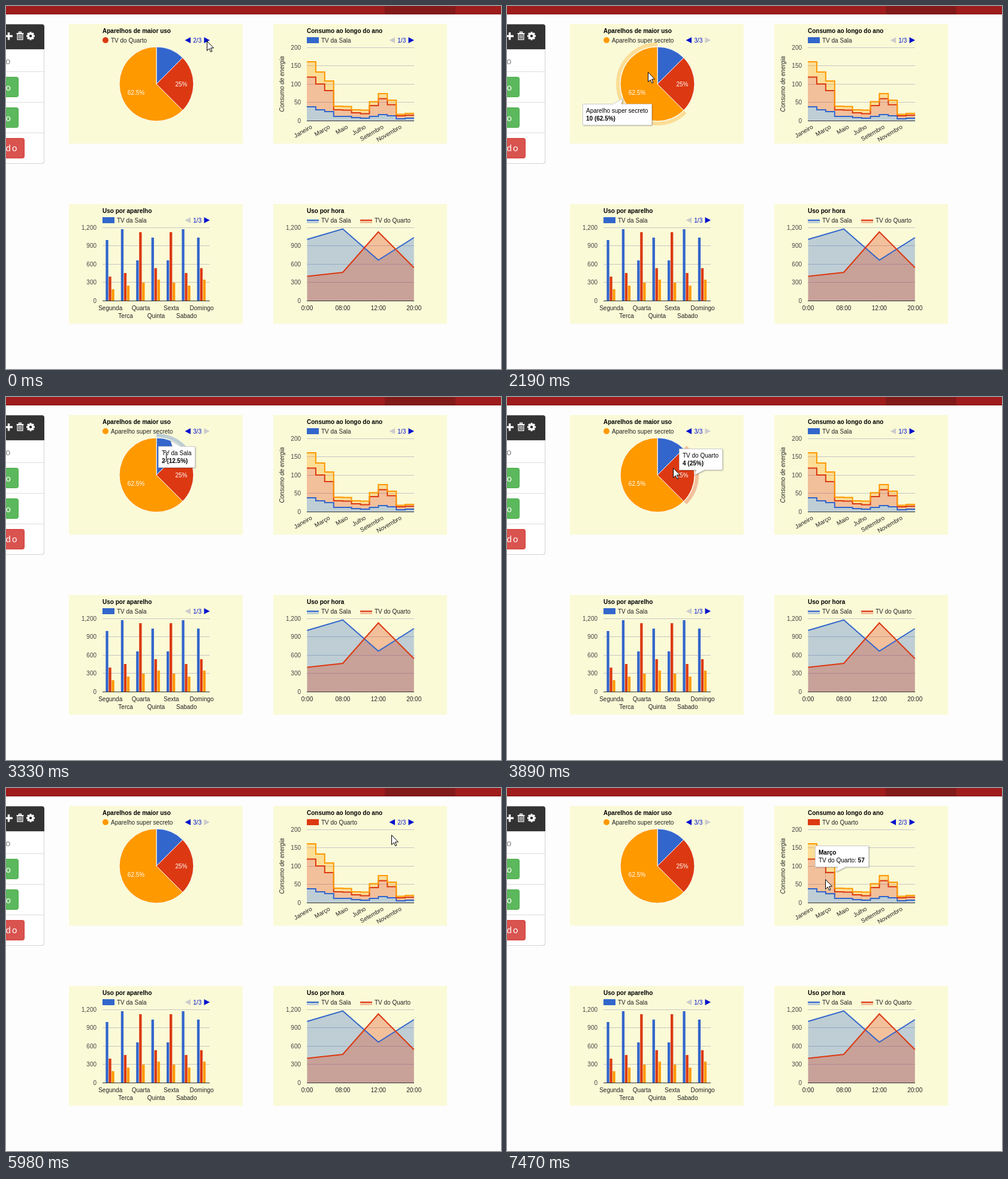
Recreate the animation shown at these times as an HTML page with a canvas. Size 826 by 605 pixels, loop 8 s.

```html
<!DOCTYPE html>
<html lang="pt">
<head>
<meta charset="utf-8">
<title>Painel de consumo</title>
<style>
html, body { margin: 0; width: 100%; height: 100%; overflow: hidden; background: #fdfdfd; }
canvas { display: block; }
</style>
</head>
<body>
<canvas id="stage" width="826" height="605"></canvas>
<script>
const ctx = document.getElementById('stage').getContext('2d');
const LOOP = 8000;
const BLUE = '#3366cc', RED = '#dc3912', ORANGE = '#ff9900';
const SERIES = [BLUE, RED, ORANGE];
const NAMES = ['TV da Sala', 'TV do Quarto', 'Aparelho super secreto'];
const SANS = '"Liberation Sans", Arial, sans-serif';
const REGULAR = '10px ' + SANS, BOLD = 'bold 10px ' + SANS, ITALIC = 'italic 10px ' + SANS;
const PIE = { x: 251, y: 130, r: 62, cuts: [0, 0.125, 0.375, 1] };

// Each row: start time, x, y, optional pointer kind.
const POINTER = [
  [0, 335, 58], [730, 324, 60], [850, 306, 49], [1010, 305, 60], [1150, 302, 61],
  [1800, 291, 70], [1930, 276, 82], [2050, 260, 95], [2190, 235, 110],
  [2760, 265, 101], [2910, 267, 101], [3330, 267, 100, 'beam'], [3730, 277, 118],
  [4350, 330, 115], [4470, 380, 117], [4620, 476, 93], [4770, 545, 78], [4890, 607, 65],
  [5040, 632, 55], [5170, 662, 54, 'beam'], [5310, 670, 55], [5430, 675, 58],
  [5980, 643, 78], [6110, 604, 103], [6230, 570, 125],
  [6370, 560, 123], [6500, 551, 121], [6620, 545, 123], [6740, 539, 125],
  [7320, 534, 141], [7470, 531, 152]
];
// Each row: start time, hovered item.
const HOVER = [
  [0, null], [2190, 'pie2'], [2760, 'pie0'], [2910, null], [3180, 'pie0'], [3730, null],
  [3890, 'pie1'], [4350, null], [6880, 'step2'], [7470, 'step1']
];
const at = (rows, t) => rows.filter(row => row[0] <= t).pop();

function text(str, x, y, { font = REGULAR, color = '#222', align = 'left', angle = 0 } = {}) {
  ctx.save();
  ctx.translate(x, y);
  if (angle) ctx.rotate(angle * Math.PI / 180);
  ctx.font = font;
  ctx.fillStyle = color;
  ctx.textAlign = align;
  ctx.fillText(str, 0, 0);
  ctx.restore();
}

function rect(x, y, w, h, color) {
  ctx.fillStyle = color;
  ctx.fillRect(x, y, w, h);
}

function trace(points, close) {
  ctx.beginPath();
  points.forEach(([x, y]) => ctx.lineTo(x, y));
  if (close) ctx.closePath();
}

function polygon(points, color) {
  trace(points, true);
  ctx.fillStyle = color;
  ctx.fill();
}

function line(points, color, width = 2) {
  trace(points);
  ctx.strokeStyle = color;
  ctx.lineWidth = width;
  ctx.stroke();
}

function band(top, bottom, color) {
  ctx.globalAlpha = 0.3;
  polygon([...top, ...[...bottom].reverse()], color);
  ctx.globalAlpha = 1;
}

function roundBox(x, y, w, h, radii, color) {
  ctx.beginPath();
  ctx.roundRect(x, y, w, h, radii);
  ctx.fillStyle = color;
  ctx.fill();
}

function card(x, y, title) {
  rect(x, y, 290, 199.5, '#fafad7');
  text(title, x + 56, y + 14.5, { font: BOLD, color: '#000' });
}

function pager(x, y, page) {
  const color = on => on ? '#0011cc' : '#cccccc';
  polygon([[x + 9.5, y - 5], [x + 9.5, y + 5], [x, y]], color(page > 1));
  polygon([[x + 32, y - 5], [x + 32, y + 5], [x + 41.5, y]], color(page < 3));
  text(page + '/3', x + 13.8, y + 3.5, { color: '#0011cc' });
}

function boxLegend(x, y, item) {
  rect(x, y - 5, 20, 10, SERIES[item]);
  text(NAMES[item], x + 24, y + 3.5);
}

function grid(x, y, labels) {
  labels.forEach((label, i) => {
    const gy = Math.round(y + i * 30.6);
    rect(x, gy, 179, 1, i === labels.length - 1 ? '#333' : '#c6c6c6');
    text(label, x - 10, gy + 3.5, { color: '#444', align: 'right' });
  });
}

function gear(x, y) {
  ctx.fillStyle = '#fff';
  for (let i = 0; i < 8; i++) {
    ctx.save();
    ctx.translate(x, y);
    ctx.rotate(i * Math.PI / 4);
    ctx.fillRect(-1.6, -7, 3.2, 4);
    ctx.restore();
  }
  ctx.beginPath();
  ctx.arc(x, y, 5.2, 0, 7);
  ctx.fill();
  ctx.beginPath();
  ctx.arc(x, y, 2.3, 0, 7);
  ctx.fillStyle = '#333';
  ctx.fill();
}

function trash(x, y) {
  rect(x - 6, y - 5, 12, 1.6, '#fff');
  ctx.strokeStyle = '#fff';
  ctx.lineWidth = 1.3;
  ctx.strokeRect(x - 2, y - 6.8, 4, 2);
  ctx.strokeRect(x - 4.4, y - 3.5, 8.8, 9.5);
  [-2, 0, 2].forEach(dx => rect(x + dx - 0.5, y - 2, 1, 6.5, '#fff'));
}

function chrome() {
  rect(0, 0, 826, 605, '#fdfdfd');
  rect(0, 0, 826, 14, '#9f1c1c');
  rect(632, 0, 118, 14, '#821a1a');
  rect(0, 13, 826, 1, 'rgba(90,0,0,.35)');

  roundBox(-10, 30.5, 74, 232.5, [0, 4, 4, 0], '#d4d4d4');
  roundBox(-10, 31, 73, 231, [0, 4, 4, 0], '#fff');
  roundBox(-10, 30.5, 74, 41.5, [0, 4, 0, 0], '#333');
  [72, 109, 160, 211].forEach(y => rect(0, y, 63, 1, '#ddd'));
  rect(-2, 48.5, 13, 3.4, '#fff');
  rect(2.8, 44, 3.4, 12.5, '#fff');
  trash(23.5, 50);
  gear(41, 50);

  const label = (str, x, y, color) =>
    text(str, x, y, { font: '15px Lato, "Open Sans", sans-serif', color, align: 'right' });
  label('o', 7.5, 97, '#888');
  [118, 169].forEach(y => {
    roundBox(-10, y, 31, 34, 4, '#4cae4c');
    roundBox(-10, y + 1, 30, 32, 3, '#5cb85c');
    label('o', 8, y + 23, '#fff');
  });
  roundBox(-10, 220, 41, 34, 4, '#d43f3a');
  roundBox(-10, 221, 40, 32, 3, '#d9534f');
  label('d', 8, 242, '#fff');
  label('o', 18.5, 242, '#fff');
}

const turn = share => (share * 2 - 0.5) * Math.PI;

function pieChart(page, hovered) {
  const { x, y, r, cuts } = PIE;
  card(105, 30, 'Aparelhos de maior uso');
  ctx.beginPath();
  ctx.arc(166, 57, 5, 0, 7);
  ctx.fillStyle = SERIES[page - 1];
  ctx.fill();
  text(NAMES[page - 1], 175, 60.5);
  pager(298.5, 57, page);

  SERIES.forEach((color, i) => {
    ctx.beginPath();
    ctx.moveTo(x, y);
    ctx.arc(x, y, r, turn(cuts[i]), turn(cuts[i + 1]));
    ctx.closePath();
    ctx.fillStyle = color;
    ctx.fill();
    ctx.strokeStyle = '#fff';
    ctx.lineWidth = 1;
    ctx.stroke();
    if (hovered === 'pie' + i) {
      ctx.beginPath();
      ctx.arc(x, y, 66, turn(cuts[i]), turn(cuts[i + 1]));
      ctx.globalAlpha = 0.3;
      ctx.strokeStyle = color;
      ctx.lineWidth = 6;
      ctx.stroke();
      ctx.globalAlpha = 1;
    }
  });
  text('62.5%', 217, 147.5, { color: '#fff', align: 'center' });
  text('25%', 292.5, 133.5, { color: '#fff', align: 'center' });
}

const STEP_TOPS = [
  [168, 173, 176, 184, 184, 186, 187, 184, 181, 183, 188, 187],
  [118.5, 130, 141, 173, 173.5, 178, 179.5, 166, 154.5, 164.5, 183, 182],
  [93, 110, 125, 167, 167.5, 173, 173.5, 159.5, 146, 157, 180.5, 179]
];
const stairs = tops => tops.flatMap((y, i) => [[502 + i * 14.92, y], [502 + (i + 1) * 14.92, y]]);

function stepChart(page, hovered) {
  card(446, 30, 'Consumo ao longo do ano');
  boxLegend(502, 57, page - 1);
  pager(639.5, 57, page);
  grid(502, 68.6, ['200', '150', '100', '50', '0']);
  const levels = STEP_TOPS.map(stairs);
  levels.forEach((top, i) => band(top, i ? levels[i - 1] : [[502, 191], [681, 191]], SERIES[i]));
  levels.forEach((top, i) => line(top, SERIES[i]));
  if (hovered === 'step1') {
    ctx.strokeStyle = 'rgba(0,0,0,.12)';
    ctx.lineWidth = 1;
    ctx.strokeRect(531.5, 139.5, 16, 38);
  }
  ['Janeiro', 'Março', 'Maio', 'Julho', 'Setembro', 'Novembro'].forEach((month, i) =>
    text(month, 511.5 + i * 29.85, 203.5, { align: 'right', angle: -30 }));
  text('Consumo de energia', 464, 130, { font: ITALIC, align: 'center', angle: -90 });
}

function columnChart() {
  card(105, 330, 'Uso por aparelho');
  boxLegend(161, 357, 0);
  pager(298.5, 357, 1);
  grid(161, 368.6, ['1,200', '900', '600', '300', '0']);
  const tops = [
    [390, 372, 424, 386, 424, 372, 386],
    [451, 445, 377, 437, 377, 445, 437],
    [472, 466, 461, 456, 461, 466, 456]
  ];
  tops.forEach((row, s) => row.forEach((y, i) =>
    rect(166.4 + i * 25.4 + s * 5, y, 4.3, 491 - y, SERIES[s])));
  ['Segunda', 'Terca', 'Quarta', 'Quinta', 'Sexta', 'Sabado', 'Domingo'].forEach((day, i) =>
    text(day, 174.2 + i * 25.4, 506.5 + (i % 2) * 13, { align: 'center' }));
}

function areaChart() {
  card(446, 330, 'Uso por hora');
  [502, 591].forEach((x, i) => {
    band([[x, 357], [x + 20, 357]], [[x, 362], [x + 20, 362]], SERIES[i]);
    line([[x, 357], [x + 20, 357]], SERIES[i]);
    text(NAMES[i], x + 24, 360.5);
  });
  grid(502, 368.6, ['1,200', '900', '600', '300', '0']);
  const curves = [[389, 371.5, 423.5, 386], [450.5, 444, 376.5, 436]]
    .map(ys => ys.map((y, i) => [502.5 + i * 59.4, y]));
  const base = [[502.5, 491], [680.7, 491]];
  curves.forEach((curve, i) => band(curve, base, SERIES[i]));
  curves.forEach((curve, i) => line(curve, SERIES[i]));
  ['0:00', '08:00', '12:00', '20:00'].forEach((hour, i) =>
    text(hour, 502.5 + i * 59.4, 506.5, { align: 'center' }));
}

// lines: arrays of [string, font] runs; the tail points at (tipX, tipY).
function tooltip(tipX, tipY, side, below, lines) {
  const measure = runs => runs.reduce((sum, [str, font]) => {
    ctx.font = font;
    return sum + ctx.measureText(str).width;
  }, 0);
  const w = Math.round(Math.max(...lines.map(measure)) + 12), h = 35;
  const mid = tipX + side * 10;
  const left = Math.round(mid - w / 2) + 0.5;
  const top = Math.round(below ? tipY + 9.5 : tipY - 9 - h) + 0.5;
  const right = left + w, bottom = top + h;
  const tail = [[mid - 7, 0], [tipX, tipY], [mid + 7, 0]].map(([x, y]) => [x, y || (below ? top : bottom)]);
  const outline = below
    ? [[left, top], ...tail, [right, top], [right, bottom], [left, bottom]]
    : [[left, top], [right, top], [right, bottom], ...tail.reverse(), [left, bottom]];
  ctx.save();
  ctx.shadowColor = 'rgba(0,0,0,.35)';
  ctx.shadowBlur = 2;
  ctx.shadowOffsetX = ctx.shadowOffsetY = 1;
  polygon(outline, '#fff');
  ctx.restore();
  trace(outline, true);
  ctx.lineJoin = 'round';
  ctx.strokeStyle = '#ccc';
  ctx.lineWidth = 1;
  ctx.stroke();
  ctx.lineJoin = 'miter';
  lines.forEach((runs, i) => {
    let x = left + 5.5;
    runs.forEach(([str, font]) => {
      text(str, x, top + 14 + i * 13, { font, color: '#000' });
      x += measure([[str, font]]);
    });
  });
}

function hoverTip(item) {
  if (!item) return;
  const i = +item.slice(-1);
  if (item.startsWith('pie')) {
    const angle = turn((PIE.cuts[i] + PIE.cuts[i + 1]) / 2);
    const x = PIE.x + PIE.r * Math.cos(angle), y = PIE.y + PIE.r * Math.sin(angle);
    const value = ['2 (12.5%)', '4 (25%)', '10 (62.5%)'][i];
    tooltip(x, y, i === 2 ? -1 : 1, i !== 1, [[[NAMES[i], REGULAR]], [[value, BOLD]]]);
  } else {
    const value = i === 1 ? '57' : '25.5';
    tooltip(548.5, i === 1 ? 140 : 124, 1, false,
      [[['Março', BOLD]], [[NAMES[i] + ': ', REGULAR], [value, BOLD]]]);
  }
}

function pointer([, x, y, kind]) {
  ctx.save();
  ctx.translate(x + 0.5, y + 0.5);
  if (kind === 'beam') {
    [['#fff', 2.4], ['#000', 1]].forEach(([color, width]) => {
      line([[0, -7], [0, 6]], color, width);
      line([[-3.5, -8], [-1, -8], [0, -7], [1, -8], [3.5, -8]], color, width);
      line([[-3.5, 7], [-1, 7], [0, 6], [1, 7], [3.5, 7]], color, width);
    });
  } else {
    polygon([[0, 0], [0, 16], [3.7, 12.5], [6.2, 18], [8.4, 17], [6, 11.5], [11, 11.5]], '#fff');
    ctx.strokeStyle = '#000';
    ctx.lineWidth = 1;
    ctx.stroke();
  }
  ctx.restore();
}

function draw(t) {
  const hovered = at(HOVER, t)[1];
  chrome();
  pieChart(t < 430 ? 2 : 3, hovered);
  stepChart(t < 5710 ? 1 : 2, hovered);
  columnChart();
  areaChart();
  hoverTip(hovered);
  pointer(at(POINTER, t));
}

const start = performance.now();
function tick() {
  draw((performance.now() - start) % LOOP);
  requestAnimationFrame(tick);
}
tick();
</script>
</body>
</html>
```
